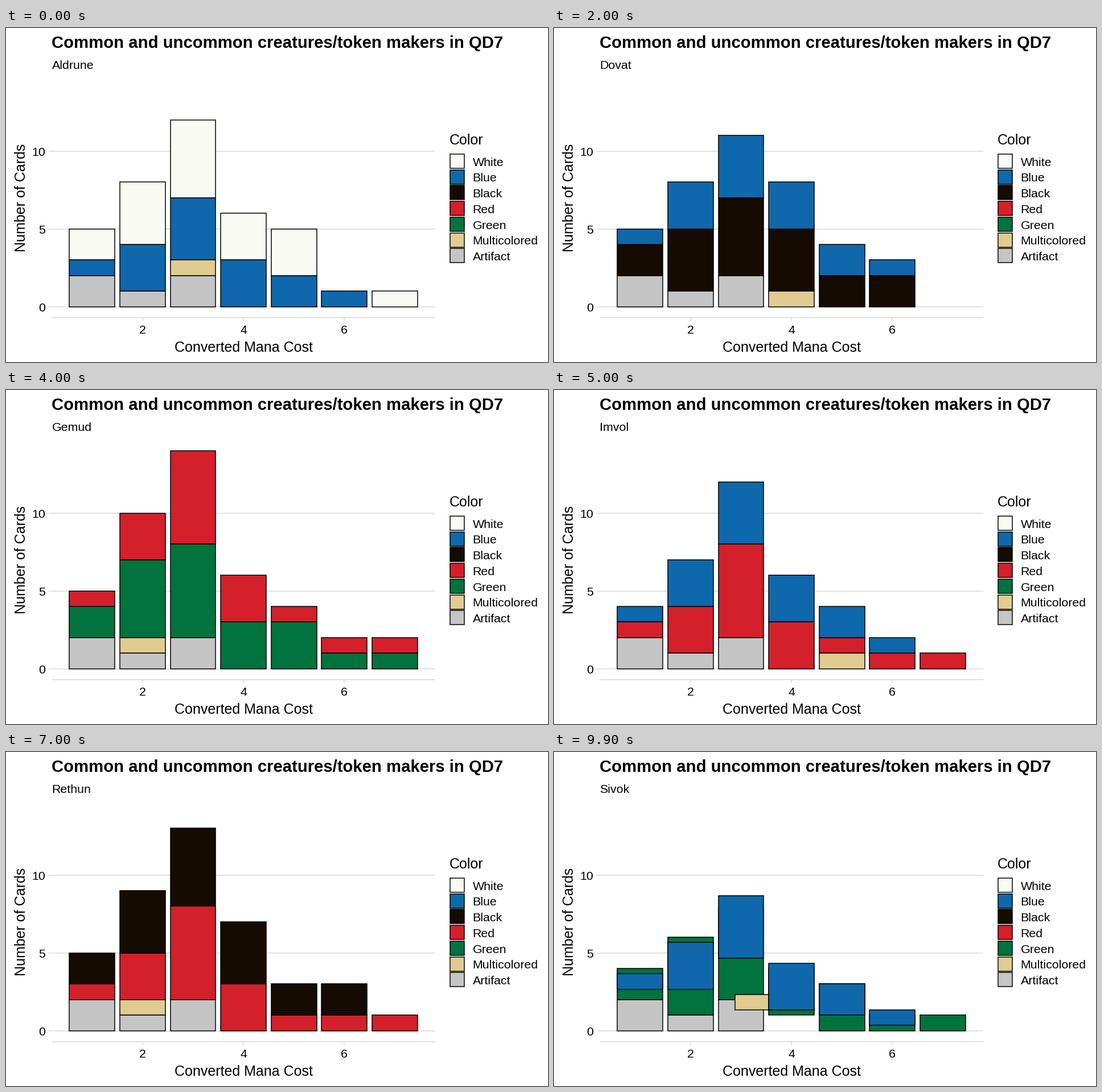
Write a matplotlib script that moves like this. It is 952 px wide and 588 px high and loops after 10000 ms.

```python
import matplotlib.pyplot as plt
from matplotlib.animation import FuncAnimation
from matplotlib.patches import Rectangle

W, H, DPI = 952, 588, 64
PT = 72 / DPI  # points per pixel
plt.rcParams["font.family"] = "Liberation Sans"

GRID = "#D9D9D9"
LINE = 1.5
UNIT_X, UNIT_Y = 88.6, 27.4  # pixels per mana and per card
COLORS = {
    "White": "#F9FAF4",
    "Blue": "#0E68AB",
    "Black": "#150B00",
    "Red": "#D3202A",
    "Green": "#00733E",
    "Multicolored": "#E0CC91",
    "Artifact": "#C5C5C5",
}

# Cards at each cost from 1 to 7
COUNTS = {
    "White": (2, 4, 5, 3, 3, 0, 1),
    "Blue": (1, 3, 4, 3, 2, 1, 0),
    "Black": (2, 4, 5, 4, 2, 2, 0),
    "Red": (1, 3, 6, 3, 1, 1, 1),
    "Green": (2, 5, 6, 3, 3, 1, 1),
    "Artifact": (2, 1, 2, 0, 0, 0, 0),
}

# Guild, its two colors, cost of its multicolored card
GUILDS = [
    ("Aldrune", "White", "Blue", 3),
    ("Bovak", "White", "Red", 3),
    ("Dovat", "Blue", "Black", 4),
    ("Gavrosk", "Black", "Green", 4),
    ("Gemud", "Red", "Green", 2),
    ("Imvol", "Blue", "Red", 5),
    ("Ondvek", "White", "Black", None),
    ("Rethun", "Black", "Red", 2),
    ("Sorelwyn", "White", "Green", 3),
    ("Sivok", "Blue", "Green", 4),
]
STEPS, HOLD = 10, 8  # frames per guild, frames at rest


def px(cost):
    return 62.75 + UNIT_X * cost


def py(count):
    return 490.6 - UNIT_Y * count


def stack(first, second, gold):
    """Map each bar piece to (cost, bottom, height), in drawing order."""
    pieces = {}
    for cost in range(1, 8):
        base = 0
        for name in reversed(COLORS):
            if name == "Multicolored":
                n, key = int(cost == gold), name
            elif name in (first, second, "Artifact"):
                n, key = COUNTS[name][cost - 1], (name, cost)
            else:
                continue
            if n:
                pieces[key] = (cost, base, n)
                base += n
    return pieces


STACKS = [stack(*guild[1:]) for guild in GUILDS]

fig = plt.figure(figsize=(W / DPI, H / DPI), dpi=DPI, facecolor="white")
ax = fig.add_axes([0, 0, 1, 1])
ax.set_xlim(0, W)
ax.set_ylim(H, 0)
ax.axis("off")


def text(x, y, s, size, **kw):
    return ax.text(x, y, s, fontsize=size * PT, color="black",
                   va="baseline", **kw)


def rule(xs, ys):
    ax.plot(xs, ys, color=GRID, lw=LINE * PT, solid_capstyle="butt", zorder=1)


def box(x, y, w, h, name):
    return ax.add_patch(Rectangle((x, y), w, h, facecolor=COLORS[name],
                                  edgecolor="black", lw=LINE * PT, zorder=2))


def draw_axes():
    for n in (0, 5, 10):
        rule((75, 753.5), (py(n), py(n)))
        text(69.5, py(n) + 8, str(n), 21.4, ha="right")
    rule((80.5, 753.5), (510, 510))
    for cost in (2, 4, 6):
        rule((px(cost), px(cost)), (510, 516))
        text(px(cost), 538.5, str(cost), 21.4, ha="center")
    text(417.3, 570, "Converted Mana Cost", 25, ha="center")
    text(34, 299, "Number of Cards", 25, ha="center",
         rotation=90, rotation_mode="anchor")


def draw_legend():
    text(778.5, 204.8, "Color", 25)
    for i, name in enumerate(COLORS):
        y = 234.3 + 27.75 * i
        box(780, y - 12.5, 25, 25, name)
        text(819.5, y + 8.4, name, 21.4)


draw_axes()
draw_legend()
text(80.5, 35, "Common and uncommon creatures/token makers in QD7", 29.2,
     weight="bold")
subtitle = text(80.5, 72, "", 21.4)
bars = []


def update(frame):
    state, step = divmod(frame, STEPS)
    t = max(0, step - HOLD + 1) / (STEPS - HOLD + 1)
    now, after = STACKS[state], STACKS[(state + 1) % len(STACKS)]
    subtitle.set_text(GUILDS[state][0])
    while bars:
        bars.pop().remove()
    # Shared pieces slide; the others wait for the next guild
    for key, start in now.items():
        end = after.get(key, start)
        cost, base, n = (a + (b - a) * t for a, b in zip(start, end))
        name = key if isinstance(key, str) else key[0]
        bars.append(box(px(cost - 0.45), py(base + n),
                        0.9 * UNIT_X, n * UNIT_Y, name))
    return bars


anim = FuncAnimation(fig, update, frames=STEPS * len(GUILDS), interval=100,
                     repeat=True, repeat_delay=0, blit=False)
plt.show()
```
